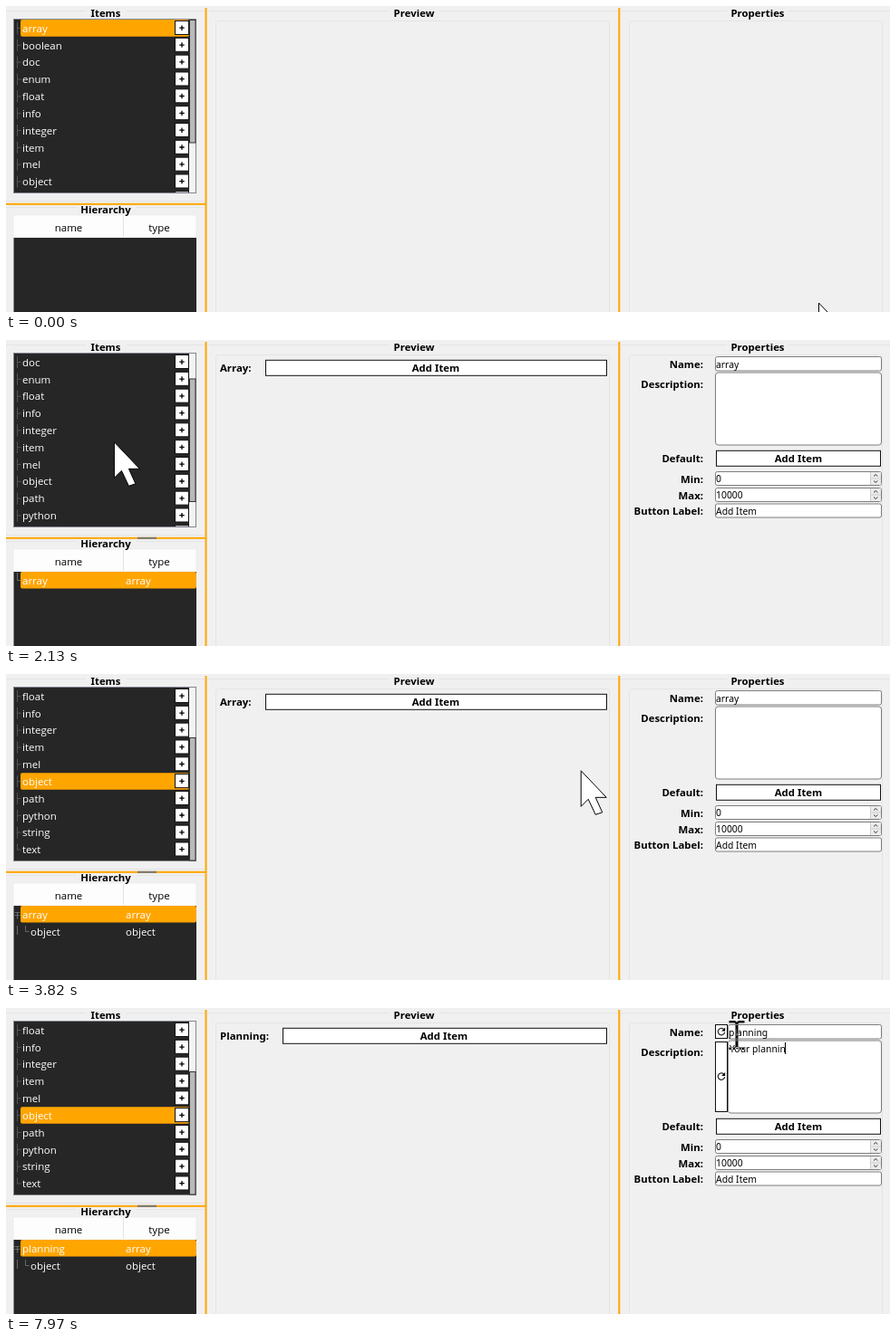
These frames come from a looping animation (975 px wide and 338 px high, 8000 ms). An HTML page:

```html
<!DOCTYPE html>
<html lang="en">
<head>
<meta charset="utf-8">
<title>Form builder</title>
<style>
html, body { margin: 0; width: 100%; height: 100%; overflow: hidden; background: #f0f0f0; }
svg { display: block; width: 975px; height: 338px; }
text { font: 11.5px "Open Sans", "Noto Sans", sans-serif; white-space: pre; }
.b { font: bold 11.4px "Noto Sans", "Open Sans", sans-serif; }
.v { font: 10.4px "Noto Sans", "Open Sans", sans-serif; }
.w { fill: #fff; }
.mid { text-anchor: middle; }
.end { text-anchor: end; }
.frame { fill: none; stroke: #e4e4e4; }
.field { fill: #fff; stroke: #7d7d7d; }
.btn { fill: #fff; stroke: #111; }
.tree { fill: none; stroke: #686868; }
.line { fill: none; stroke: #333; }
.orange { fill: #ffa500; }
#beam { fill: #fff; mix-blend-mode: difference; }
</style>
</head>
<body>
<svg id="stage" viewBox="0 0 975 338" xmlns="http://www.w3.org/2000/svg"></svg>
<script>
const LOOP = 8000, ROW = 18.83;
const items = ["array", "boolean", "doc", "enum", "float", "info", "integer", "item",
  "mel", "object", "path", "python", "string", "text"];

// markup helpers
const rect = (x, y, w, h, cls, more = "") =>
  `<rect x="${x}" y="${y}" width="${w}" height="${h}" class="${cls}" ${more}/>`;
const text = (x, y, s, cls = "", more = "") =>
  `<text x="${x}" y="${y}" class="${cls}" ${more}>${s}</text>`;
const path = (d, cls, more = "") => `<path d="${d}" class="${cls}" ${more}/>`;
const group = (id, body, more = "") => `<g id="${id}" ${more}>${body}</g>`;

const reload = (x, y) =>
  path(`M${x + 2.6} ${y - 2.6}A3.7 3.7 0 1 0 ${x + 3.7} ${y + .6}`, "line", 'stroke-width="1.3"') +
  path(`M${x + 4.2} ${y - 4.6}v4h-4z`, "");

const spin = (y, value) =>
  rect(782.5, y + .5, 183, 15, "field", 'rx="2"') +
  rect(953, y + 1, 12, 14, "", 'fill="#ececec"') +
  path(`M953.5 ${y + 1}v14M953 ${y + 8}h12`, "", 'stroke="#cfcfcf"') +
  path(`M957 ${y + 5.5}l2.2 -2 2.2 2M957 ${y + 10.5}l2.2 2 2.2 -2`, "line") +
  text(783, y + 12.2, value, "v");

const itemRow = (name, i) => {
  const y = 15 + i * ROW, last = i === items.length - 1;
  return path(`M12.5 ${y + 3}v${last ? 7 : 13}M12.5 ${y + 9.5}h4`, "tree", 'opacity=".7"') +
    text(18, y + 13.7, name, "w", `id="item${i}"`) +
    rect(186.5, y + 1.5, 15, 15, "btn") +
    path(`M191.300 ${y + 9.2}h5.400M194 ${y + 6.5}v5.400`, "", 'stroke="#000" stroke-width="1.3"');
};

const panels =
  rect(0, 0, 975, 338, "", 'fill="#f0f0f0"') +
  path("M0 5.5H88M133 5.5H219M222 5.5H422M478 5.5H675M678 5.5H795M863 5.5H975M0 222.5H78M143 222.5H219M0 215.5H219", "frame") +
  rect(231.5, 16.5, 434, 340, "frame", 'rx="3"') +
  rect(687.5, 16.5, 279, 340, "frame", 'rx="3"') +
  rect(219.5, 2, 2, 336, "orange") + rect(675.3, 2, 2, 336, "orange") +
  rect(0, 217.8, 220, 2, "orange") +
  text(110, 12, "Items", "b mid") + text(450, 12, "Preview", "b mid") +
  text(829, 12, "Properties", "b mid") +
  rect(145, 217.8, 21, 2, "", 'id="grip" fill="#777"');

const list =
  rect(8.5, 14.5, 201, 192, "", 'fill="#262626" stroke="#828790"') +
  `<clipPath id="clip">${rect(9, 15, 194, 191, "")}</clipPath>` +
  group("view", group("rows",
    rect(16, 15, 186, 18.7, "orange", 'id="pick" rx="2"') + items.map(itemRow).join("")),
    'clip-path="url(#clip)"') +
  rect(202, 15, 7, 191, "", 'fill="#f3f3f3"') +
  rect(202.5, 15.5, 6.5, 135.5, "", 'id="thumb" fill="#b9b9b9" stroke="#333"');

const hierarchy =
  rect(8, 231, 202, 25, "", 'fill="#fdfdfd" stroke="#e6e6e6" stroke-width=".6"') +
  path("M129.5 232v23", "frame") +
  text(110, 229, "Hierarchy", "b mid") +
  text(69, 249, "name", "mid") + text(169, 249, "type", "mid") +
  rect(8.5, 256, 201.5, 82, "", 'fill="#262626"') +
  group("node",
    rect(16, 256, 194, 18.5, "orange", 'rx="2"') +
    path("M12.5 257v8.5h4", "tree", 'id="leaf"') +
    text(18, 270, "array", "w", 'id="nodeName"') + text(132, 270, "array", "w")) +
  group("child",
    path("M9.5 263.5h6M9.5 266.5h6M12.5 263v7.5M12.5 278v10M21.5 278v6.500h4", "tree") +
    text(27, 289, "object", "w") + text(132, 289, "object", "w"));

const labels = [["Name:", 30.5], ["Description:", 53], ["Default:", 135], ["Min:", 157.5],
  ["Max:", 175.5], ["Button Label:", 193]].map(([s, y]) => text(769, y, s, "b end")).join("");

const editor = group("editor",
  text(236, 35, "Array:", "b", 'id="formLabel"') +
  rect(286.5, 22.3, 376, 17, "btn", 'id="add"') +
  text(474, 35, "Add Item", "b mid", 'id="addText"') +
  labels +
  rect(782.5, 18.5, 183, 15.5, "field", 'id="nameBox" rx="2"') +
  rect(783, 19.500, 26, 14, "", 'id="mark" fill="#0078d7"') +
  text(783, 30.5, "array", "v", 'id="nameText"') +
  group("nameReset", rect(782.5, 18.5, 13, 15, "btn") + reload(789, 26)) +
  rect(782.5, 36, 183, 80, "field", 'id="noteBox" rx="3"') +
  text(798, 48.5, "", "v", 'id="noteText"') +
  group("noteReset", rect(782.5, 37.5, 13, 77, "btn") + reload(789, 75.5)) +
  path("M0 0v13", "", 'id="caret" stroke="#000"') +
  rect(783.5, 122.3, 181, 17, "btn") + text(874, 135, "Add Item", "b mid") +
  spin(145, "0") + spin(163, "10000") +
  rect(782.5, 181, 183, 15, "field", 'rx="2"') + text(783, 193, "Add Item", "v"));

// offsets are relative to the pointer tip
const ghost = group("ghost",
  rect(-149, -28, 423, 47, "orange", 'rx="4"') + rect(274, -28, 40, 47, "orange", 'rx="4"') +
  text(-144, 7.5, "object", "w", 'style="font-size:28.75px"'));
const arrow = "M.5 0V39.5L8.500 31.5L16.500 48.500L24 46L16.500 29.500H28.500Z";
const beam = "M-8.500 -16h6.500l2 1.500 2 -1.500h6.500v2.500h-6l-1 1v25l1 1h6v2.500h-6.500l-2 -1.500 -2 1.500h-6.500v-2.500h6l1 -1v-25l-1 -1h-6z";
const pointer = group("pointer",
  ghost +
  `<circle id="press" r="30" fill="#e6dc00" fill-opacity=".72"/>` +
  path(arrow, "", 'id="arrow" fill="#fff" stroke="#000"') +
  group("copy", rect(14, 19.5, 9, 9, "btn") + path("M16 24h5M18.500 21.500v5", "", 'stroke="#000"'))) +
  path(beam, "", 'id="beam"');

document.getElementById("stage").innerHTML = panels + list + hierarchy + editor + pointer;

const el = {};
document.querySelectorAll("[id]").forEach(n => el[n.id] = n);
const show = (n, on) => n.style.display = on ? "" : "none";
const set = (n, attrs) => { for (const k in attrs) n.setAttribute(k, attrs[k]); };
const within = (v, a, b) => v >= a && v < b;

// time, x, y of the pointer tip
const route = [
  [0, 896, 328], [20, 896, 328], [600, 196, 25], [800, 194, 22], [960, 194, 22],
  [1210, 135, 254], [1450, 150, 241], [1630, 152, 240], [1730, 152, 240],
  [2000, 125, 112], [2300, 110, 114], [2440, 75, 119], [2790, 75, 119],
  [3110, 186, 273], [3200, 180, 291], [3260, 178, 275], [3380, 178, 275],
  [4090, 850, 27], [4190, 850, 27], [4350, 840, 27], [4450, 840, 27],
  [4720, 628, 22], [5340, 628, 22], [5540, 940, 14], [5720, 835, 36],
  [5870, 835, 36], [6500, 842, 97], [6670, 842, 97], [6770, 839, 94],
  [6900, 839, 94], [7130, 806, 30], [LOOP, 806, 30]
];
const presses = [[640, 780], [2560, 2660], [2790, 3260], [4380, 4680], [6780, 6890]];
const nameKeys = [4940, 5050, 5090, 5140, 5190, 5360, 5430, 5500];

function tip(t) {
  const i = route.findIndex(p => p[0] > t);
  const a = route[i - 1], b = route[i];
  const k = (t - a[0]) / (b[0] - a[0]), e = k * k * (3 - 2 * k);
  return [a[1] + (b[1] - a[1]) * e, a[2] + (b[2] - a[2]) * e];
}

function draw(t) {
  const [x, y] = tip(t);
  const pressed = presses.some(p => within(t, ...p));
  const dragging = within(t, 2790, 3260);
  const added = t >= 850, nested = t >= 3260, renamed = t >= 5900;

  // item list
  const scroll = Math.max(0, Math.min(4, Math.floor((t - 1970) / 70)));
  set(el.rows, { transform: `translate(0 ${-scroll * ROW})` });
  set(el.thumb, { y: 15.5 + scroll * 13.75 });
  set(el.pick, { y: 15 + (t < 2560 ? 0 : 9 * ROW) });
  el.item1.style.fill = within(t, 960, 1850) ? "#ffa500" : "";
  show(el.grip, t >= 1850);

  // hierarchy and preview
  show(el.node, added);
  show(el.leaf, !nested);
  show(el.child, nested);
  show(el.editor, added);
  el.nodeName.textContent = renamed ? "planning" : "array";
  el.formLabel.textContent = renamed ? "Planning:" : "Array:";
  const left = renamed ? 305.5 : 286.5;
  const hover = !pressed && within(x, left, 663) && within(y, 21.5, 40);
  set(el.add, { x: left, width: 662.5 - left });
  set(el.addText, { x: renamed ? 483 : 474 });
  el.add.style.fill = hover ? "#808080" : "";
  el.addText.style.fill = hover ? "#ffa500" : "";

  // name field
  const typed = nameKeys.filter(k => t >= k).length;
  const marked = within(t, 4540, nameKeys[0]);
  el.nameText.textContent = typed ? "planning".slice(0, typed) : "array";
  el.nameText.style.fill = marked ? "#fff" : "";
  set(el.nameText, { x: typed ? 797 : 783 });
  set(el.nameBox, typed ? { x: 796.5, width: 169 } : { x: 782.5, width: 183 });
  show(el.mark, marked);
  show(el.nameReset, typed);

  // description field
  const count = Math.max(0, Math.min(12, Math.floor((t - 7270) / 62) + 1));
  el.noteText.textContent = "Your planning".slice(0, count);
  set(el.noteBox, count ? { x: 796.5, width: 169 } : { x: 782.5, width: 183 });
  show(el.noteReset, count);

  const inName = typed && !renamed, inNote = t >= 6850;
  show(el.caret, inName || inNote);
  if (inName || inNote) {
    const box = inName ? el.nameText : el.noteText;
    const start = inName ? 797 : count ? 798 : 785;
    const cx = Math.floor(start + box.getComputedTextLength()) + .5;
    set(el.caret, { transform: `translate(${cx} ${inName ? 20 : 38})` });
  }

  // pointer
  const overField = added && within(x, 782, 966) && within(y, 18, 116);
  const place = { transform: `translate(${x.toFixed(2)} ${y.toFixed(2)})` };
  set(el.pointer, place);
  set(el.beam, place);
  set(el.arrow, dragging ? { transform: "scale(.4)", "stroke-width": 2.4 }
                         : { transform: "scale(1)", "stroke-width": 1 });
  show(el.ghost, dragging);
  show(el.copy, dragging);
  show(el.press, pressed);
  show(el.beam, overField);
  show(el.arrow, !overField);
}

const start = performance.now();
function tick() {
  draw((performance.now() - start) % LOOP);
  requestAnimationFrame(tick);
}
tick();
</script>
</body>
</html>
```
